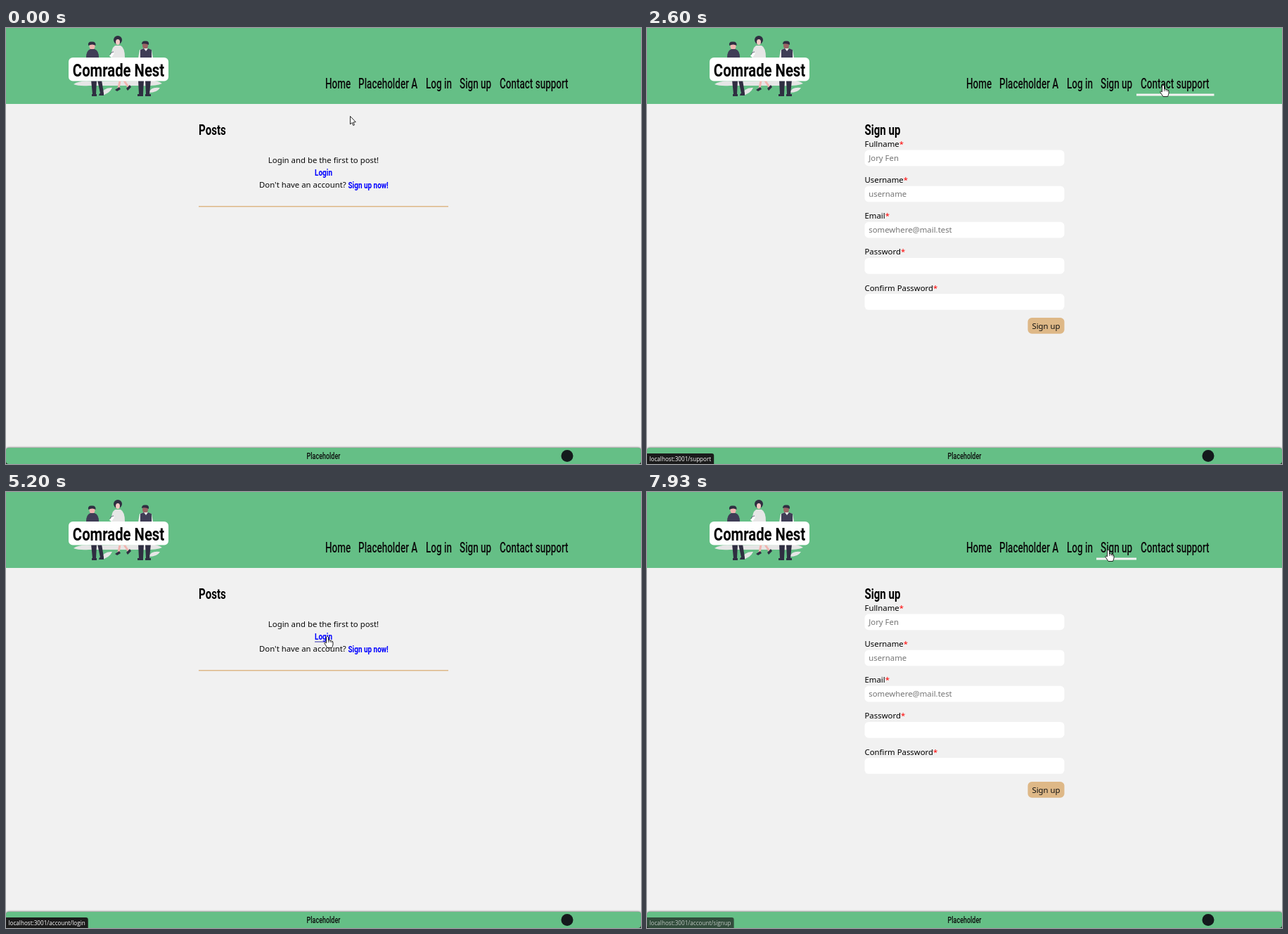
Recreate the animation shown at these times as an HTML page with a canvas. Size 903 px wide and 620 px high, loop 8 s.

```html
<!DOCTYPE html>
<html lang="en">
<head>
<meta charset="utf-8">
<title>Comrade Nest</title>
<style>
html, body { margin: 0; width: 100%; height: 100%; overflow: hidden; background: #f1f1f1; }
canvas { display: block; width: 100vw; height: 100vh; }
</style>
</head>
<body>
<canvas id="stage" width="903" height="620"></canvas>
<script>
const ctx = document.getElementById('stage').getContext('2d');
const LOOP = 8000, FPS = 15;
const GREEN = '#65bf86', PAPER = '#f1f1f1', SAND = '#deb887';
const NAVY = '#2f2e41', SLATE = '#3f3d56', VIOLET = '#6c63ff', FAIR = '#f0b5b0', BROWN = '#9b6464';

// Typefaces; the display face is a condensed sans
const BODY = { family: '"Noto Sans", sans-serif', weight: 400, wide: 1 };
const THIN = { family: 'Roboto, sans-serif', weight: 500, wide: .685 };
const BOLD = { family: 'Roboto, sans-serif', weight: 700, wide: .765 };
const SYSTEM = { family: '"Open Sans", sans-serif', weight: 400, wide: 1 };
const SIZE = 11.36;

const NAV = [['Home', 454], ['Placeholder A', 501], ['Log in', 597], ['Sign up', 645], ['Contact support', 702], ['', 812.5]];

const PAGES = [
  [0, home], [600, comingSoon], [1670, () => logIn(false)], [2400, signUp], [3330, support],
  [4730, home], [5670, () => logIn(false)], [6800, () => logIn(true)], [7860, signUp]
];

// Nav link, start, end
const HOVERS = [
  [1, 270, 600], [1, 600, 930], [2, 1000, 1670], [2, 1670, 1730], [3, 1800, 2400],
  [4, 2470, 3330], [4, 3330, 3800], [3, 7530, 7860], [3, 7860, 8000]
];

const LINKS = [
  [270, 1000, '/placeholder'], [1000, 1800, '/account/login'], [1800, 2470, '/account/signup'],
  [2470, 3800, '/support'], [4000, 4870, ''], [5070, 6200, '/account/login'], [7860, 8000, '/account/signup']
];

// Time, x, y, pointer
const MOVES = [
  [0, 489, 125, 'arrow'], [130, 527, 94, 'arrow'], [200, 527, 94, 'arrow'], [270, 534, 88, 'hand'],
  [330, 541, 82, 'hand'], [870, 541, 82, 'hand'], [1000, 619, 82, 'hand'], [1670, 619, 82, 'hand'],
  [1870, 656, 82, 'hand'], [2400, 656, 82, 'hand'], [2530, 734, 81, 'hand'], [3330, 734, 82, 'hand'],
  [3730, 734, 82, 'hand'], [3800, 715, 80, 'arrow'], [4070, 186, 62, 'hand'], [4400, 186, 62, 'hand'],
  [4470, 186, 63, 'hand'], [4800, 186, 63, 'hand'], [4870, 215, 82, 'arrow'], [5130, 457, 205, 'hand'],
  [5470, 457, 205, 'hand'], [5530, 457, 207, 'hand'], [5670, 457, 207, 'arrow'], [6010, 457, 207, 'arrow'],
  [6330, 577, 264, 'hand'], [6800, 577, 264, 'ibeam'], [7130, 577, 264, 'ibeam'], [7200, 582, 248, 'arrow'],
  [7530, 656, 82, 'hand'], [8000, 656, 82, 'hand']
];

const clamp = v => Math.max(0, Math.min(1, v));
const ease = v => v * v * (3 - 2 * v);

function setFont(face, size) {
  ctx.font = `${face.weight} ${size}px ${face.family}`;
}

function text(str, x, y, face = BODY, size = SIZE, color = '#000', align = 'left') {
  ctx.save();
  ctx.translate(x, y);
  ctx.scale(face.wide, 1);
  setFont(face, size);
  ctx.textAlign = align;
  ctx.fillStyle = color;
  ctx.fillText(str, 0, 0);
  ctx.restore();
}

function rect(x, y, w, h, color, radius = 0) {
  ctx.fillStyle = color;
  ctx.beginPath();
  ctx.roundRect(x, y, w, h, radius);
  ctx.fill();
}

function shape(color, d) {
  ctx.fillStyle = color;
  ctx.fill(new Path2D(d));
}

function line(color, width, d) {
  ctx.strokeStyle = color;
  ctx.lineWidth = width;
  ctx.stroke(new Path2D(d));
}

function oval(color, x, y, rx, ry = rx) {
  ctx.fillStyle = color;
  ctx.beginPath();
  ctx.ellipse(x, y, rx, ry, 0, 0, Math.PI * 2);
  ctx.fill();
}

function people() {
  shape('#e6e6e6', 'M96 80Q104 74 124 76L196 75Q214 73 222 79Q212 83 190 82L118 82Q104 83 96 80Z');
  shape('#e6e6e6', 'M135 96Q138 84 151 85Q147 94 135 96ZM203 92Q206 83 219 85Q215 92 203 92Z');
  // left
  oval(FAIR, 122.5, 26, 4, 5);
  shape(NAVY, 'M117 25Q116 19 122 19.5Q128 19 127.5 25Q123 22 117 25Z');
  shape(SLATE, 'M114 42Q114 32 120 30L126 30Q132 32 132 42Z');
  shape(NAVY, 'M121 74H129L128 94H123ZM130 74H136L139 93H134Z');
  shape(NAVY, 'M122 94H129V97H122ZM133 93H139V96H132Z');
  // middle
  oval(NAVY, 159, 17, 6, 6);
  oval('#f6c9c4', 159, 20, 3, 4);
  shape('#e6e6e6', 'M150 42Q149 29 155 25H163Q169 28 169 42Z');
  shape('#fff', 'M147 40L151 33L154 36L150 42Z');
  line(SLATE, .8, 'M148 38Q150 33 153 34');
  line(FAIR, 3, 'M162 75L160 86M168 75L174 84');
  shape(NAVY, 'M155 88L161 84L163 87L158 90ZM171 86L176 81L178 84L173 89Z');
  // right
  oval(BROWN, 198, 25, 4, 5);
  shape(NAVY, 'M193 23Q193 18 198 18.5Q204 18 203 24Q198 21 193 23Z');
  shape('#e6e6e6', 'M188 42L190 31L196 29H201L207 31L209 42Z');
  shape(SLATE, 'M191 42V31L196 29L199 33L202 29L207 31V42Z');
  shape(NAVY, 'M188 74H196L195 94H189ZM198 74H206L204 94H199Z');
  shape(NAVY, 'M187 94H195V97H187ZM198 94H206V97H198Z');
}

function header(hoverLevel) {
  rect(0, 0, 903, 108, GREEN);
  people();
  rect(89, 42, 142, 33.5, '#fff', 6);
  text('Comrade Nest', 160, 69, BOLD, 26.5, '#000', 'center');
  NAV.slice(0, -1).forEach(([label, x], i) => {
    const age = hoverLevel(i);
    if (age > 0) {
      const left = x - 6, right = NAV[i + 1][1] - 6;
      const end = left + (right - left) * clamp(age / 60);
      const grow = ease(clamp((age - 130) / 130));
      const bottom = 96.6, top = bottom - 3 - 34 * grow, lean = 3.5 * grow;
      shape('#f5f3f3', `M${left - lean} ${top}H${end - lean}L${end} ${bottom}H${left}Z`);
    }
    text(label, x, 86, THIN, 19.7, '#0b0b0b');
  });
}

function footer() {
  rect(0, 616, 903, 4, '#333');
  ctx.save();
  ctx.shadowColor = 'rgba(0,0,0,.75)';
  ctx.shadowBlur = 3;
  rect(0, 597, 903, 23, GREEN, 4);
  ctx.restore();
  text('Placeholder', 451.5, 613, THIN, 13.1, '#0b0b0b', 'center');
  oval('#14191c', 798, 608.5, 8.5);
}

function heading(str, x) {
  text(str, x, 151.5, BOLD, 19.7);
}

function home(t) {
  heading('Posts', 274);
  text('Login and be the first to post!', 451.5, 192, BODY, SIZE, '#0a0a0a', 'center');
  text('Login', 451.5, 209.5, BOLD, 13, '#00f', 'center');
  if (t >= 5130 && t < 5670) rect(439, 212.5, 25 * clamp((t - 5060) / 130), 1, '#33a');
  text("Don't have an account?", 360, 227, BODY, SIZE, '#0a0a0a');
  text('Sign up now!', 486.5, 227.5, BOLD, 13, '#00f');
  rect(274, 253, 355, 1.4, SAND);
}

function worker(x, y, skin, arms) {
  ctx.save();
  ctx.translate(x, y);
  shape(NAVY, 'M-8 20H10L8 50H3L1 30L-1 52H-6Z');
  shape(VIOLET, 'M-7 52H0V55H-9Q-9 53 -7 52ZM3 47L8 43L10 46L5 50Z');
  line(SLATE, 6, arms);
  shape(VIOLET, 'M-9 0Q0 -5 9 0L10 21H-9Z');
  oval(skin, -3, -7, 4, 5);
  shape('#f9c94e', 'M-9 -10Q-8 -17 -3 -16.5Q3 -16 3 -9.500Q-3 -12 -9 -10Z');
  ctx.restore();
}

function comingSoon() {
  shape('#e2ede5', 'M345 305C326 297 319 282 317 263C302 240 307 186 350 181L358 181C373 145 414 131 448 131C478 132 498 141 511 150C535 139 568 148 574 178L576 198C594 214 597 250 589 266C587 290 573 303 553 305Z');
  shape('#d8dfea', 'M339 297H569Q563 305 550 305H360Q345 303 339 297Z');
  const leaf = '#cbe2d4', trunk = '#bcc9c6';
  rect(528.5, 275, 8, 16, trunk);
  oval(leaf, 535, 193, 24);
  oval(leaf, 533, 223, 23, 24);
  oval(leaf, 532, 251, 23, 24);
  shape('#e2ede5', 'M511 181L528 191L512 184ZM559 206L540 216L558 210Z');
  for (const x of [436, 472]) {
    rect(x - 3, 280, 6, 11, trunk);
    oval(leaf, x, 239, 12, 13);
    oval(leaf, x, 264, 12, 17);
  }
  const pink = '#e9b8b8', rose = '#d8a2a2';
  line(rose, 4, 'M356.5 220L352 291M457 196V297M502 214V294M558 232L563 294');
  line(pink, 3, 'M354 219L349 291M453.5 196V296M499 213V293M556 232L559 293');
  line(pink, 5, 'M354 219.5L402.5 140.5L457 196L559 233.5');
  line(rose, 2, 'M357 221L403 144L457 199.500L558 236.500');
  line(pink, 5, 'M457 237L559 256');
  line(rose, 2, 'M457 240L558 259');
  shape('#efc6c6', 'M351 290H562L456 297Z');
  shape('#c49393', 'M340 290L456 296V303L340 295Z');
  shape('#dba8a8', 'M456 296L568 291V296L456 303Z');
  line('#c99a98', 4, 'M400 230L452 218');
  worker(416.5, 229, BROWN, 'M-7 1L-13 6M7 0L14 6L9 0');
  worker(386.5, 235, FAIR, 'M-7 0L-12 6L-17 19M7 0L15 -2');
  oval(VIOLET, 368, 257, 2.5, 4);
  line('#d9aaa0', 9, 'M388 227L412 252');
  line('#c28f89', 1.5, 'M384.500 230L408.500 255');
  text('Coming soon', 451.5, 187.5, THIN, 19.3, '#000', 'center');
}

function field(label, y, hint = '') {
  text(label, 309.5, y + 4);
  setFont(BODY, SIZE);
  text('*', 309.5 + ctx.measureText(label).width, y + 4, BODY, SIZE, '#f00');
  rect(309.5, y + 8.5, 284, 22.7, '#fff', 5.7);
  text(hint, 315.2, y + 24, BODY, SIZE, '#757575');
}

function button(label, x, y) {
  rect(x, y, 593.5 - x, 22.7, SAND, 5.7);
  text(label, (x + 593.5) / 2, y + 15.5, BODY, SIZE, '#111', 'center');
}

function logIn(failed) {
  const error = (name, y) => text(`${name} cannot be empty.`, 309.5, y, BODY, SIZE, '#f00');
  heading('Log in', 309.5);
  field('Username', 165);
  field('Password', failed ? 233 : 216);
  if (failed) {
    error('Username', 209);
    error('Password', 277);
  }
  button('Login', 552, failed ? 292.5 : 258.5);
}

function signUp() {
  heading('Sign up', 309.5);
  const fields = [['Fullname', 'Jory Fen'], ['Username', 'username'], ['Email', 'somewhere@mail.test'], ['Password'], ['Confirm Password']];
  fields.forEach(([label, hint], i) => field(label, 165 + 51.15 * i, hint));
  button('Sign up', 541.5, 412);
}

function support() {
  heading('Support', 108);
  [
    'Nunc posuere at ipsum quis rutrum. Proin tristique diam nisl, in efficitur dolor varius et. Nam sit amet dolor eget ipsum lobortis',
    'eleifend. Etiam in urna congue, dictum purus vitae, sollicitudin tellus. Praesent non fringilla ligula. Aenean laoreet tortor at',
    'mauris tincidunt molestie. Curabitur in placerat sapien. In hac habitasse platea dictumst. Vivamus maximus leo auctor dictum',
    'posuere. Nullam at odio a mi commodo convallis in eu quam. Cras mi ipsum, imperdiet non vestibulum id, porta in dolor.',
    'Suspendisse hendrerit dapibus ipsum, egestas ultrices massa tincidunt ac. Sed ullamcorper rutrum ipsum non viverra.'
  ].forEach((row, i) => text(row, 108, 169 + 17.04 * i));
}

function statusBar(t) {
  const live = LINKS.find(([from, to]) => t >= from && t < to) ||
    LINKS.find(([from, to]) => t >= to && t < to + 130);
  if (!live) return;
  const [from, to, path] = live;
  const joined = LINKS.some(l => l[1] === from);
  const label = 'localhost:3001' + path;
  ctx.save();
  ctx.globalAlpha = (joined ? 1 : clamp((t - from + 20) / 130)) * (1 - clamp((t - to) / 130));
  setFont(SYSTEM, 8.15);
  rect(0, 605, ctx.measureText(label).width + 7.5, 15, '#1b1b1b', [0, 3, 0, 0]);
  text(label, 3.5, 615.5, SYSTEM, 8.15, '#fff');
  ctx.restore();
}

const POINTERS = {
  arrow() {
    const d = 'M.5 .5V12L3 9.5L4.8 13.5L6.5 12.8L4.8 9L8.3 8.7Z';
    shape('#fff', d);
    line('#111', .9, d);
  },
  hand() {
    const d = 'M-1.5 1.5Q0 -1 1.5 1.5V6Q3.2 5 4 6.5Q5.5 5.7 6.2 7.2Q8 6.8 8 9V12Q7.5 14 6.5 16.5H0Q-2 13.5 -4 10.5Q-4.5 8 -1.5 9.8Z';
    shape('#fff', d);
    line('#111', .9, d);
    line('#111', .7, 'M1.5 6V9M4 6.5V9M6.2 7.2V9.5');
  },
  ibeam() {
    line('#222', 1, 'M.5 -5V5M-2 -5.5H0M1 -5.5H3M-2 5.5H0M1 5.5H3');
  }
};

function pointer(t) {
  const next = MOVES.findIndex(m => m[0] > t);
  const [t0, x0, y0, kind] = MOVES[next - 1], [t1, x1, y1] = MOVES[next];
  const k = ease((t - t0) / (t1 - t0));
  ctx.save();
  ctx.translate(x0 + (x1 - x0) * k, y0 + (y1 - y0) * k);
  POINTERS[kind]();
  ctx.restore();
}

function draw(t) {
  const [opened, page] = PAGES.filter(p => p[0] <= t).pop();
  const hoverLevel = i => Math.max(0, ...HOVERS.map(([link, from, to]) => {
    if (link !== i || t < from) return 0;
    if (t < to) return t - from + 1;
    return to > opened ? Math.min(to - from, 260) - (t - to) * 2 : 0;
  }));
  rect(0, 0, 903, 620, PAPER);
  header(hoverLevel);
  page(t);
  footer();
  statusBar(t);
  pointer(t);
}

// The screen refreshes fifteen times a second
function tick() {
  const now = performance.now() % LOOP;
  const step = Math.floor((now + 4) * FPS / 1000);
  draw(Math.min(Math.round(step * 100 / FPS) * 10, LOOP - 70));
  requestAnimationFrame(tick);
}
tick();
</script>
</body>
</html>
```
